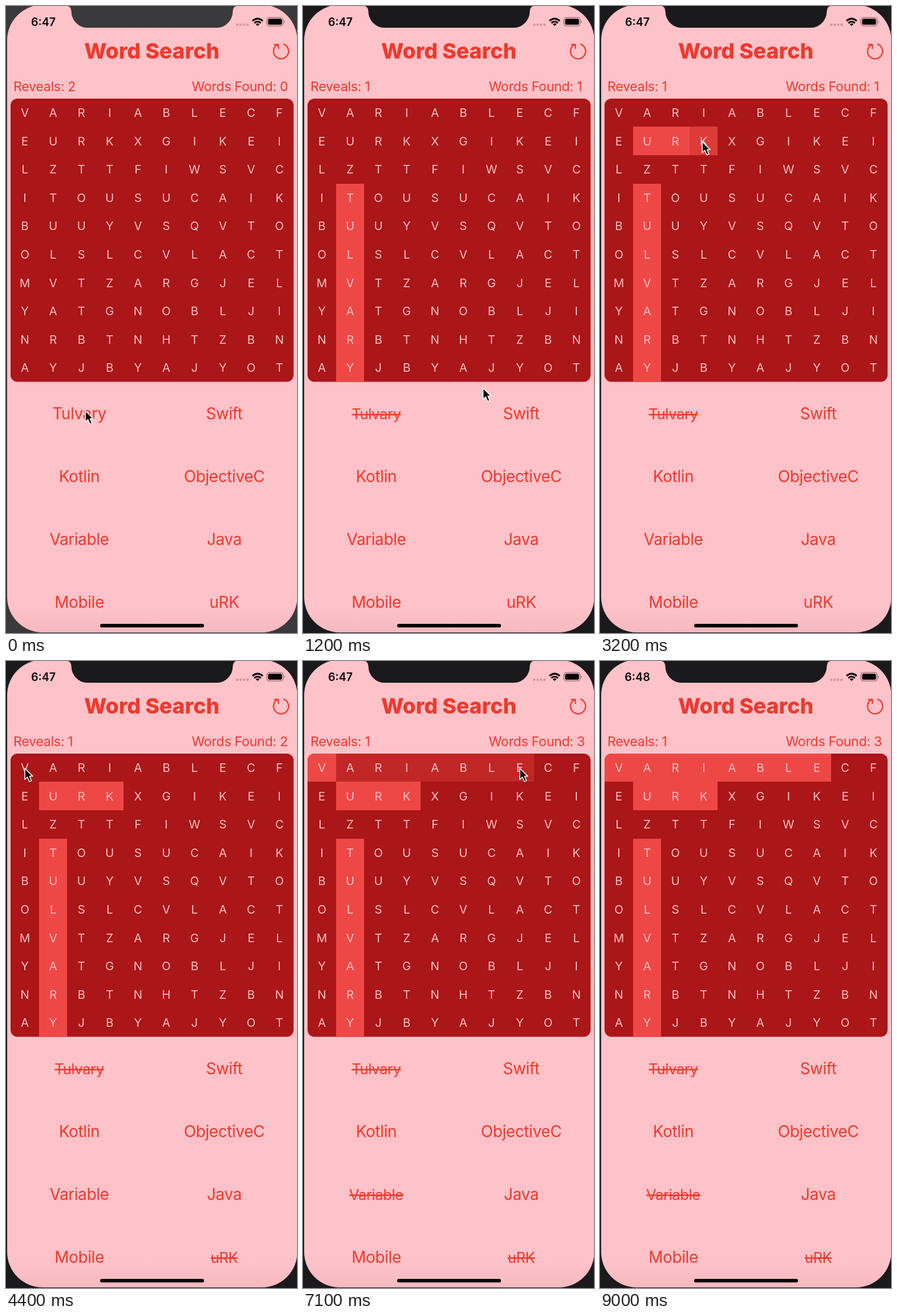
Recreate the animation shown at these times as an HTML page. Size 510 by 1097 pixels, loop 9.1 s.

```html
<!DOCTYPE html>
<html lang="en">
<head>
<meta charset="utf-8">
<title>Word Search</title>
<style>
  html, body { margin: 0; width: 100%; height: 100%; overflow: hidden; background: #1a191b; }
  svg { display: block; font-family: Inter, Roboto, sans-serif; }
  .label { font-size: 23.2px; letter-spacing: -.3px; }
  .word { font-size: 28px; letter-spacing: -.4px; text-anchor: middle; }
  .word.found { font-size: 25.6px; text-decoration: line-through; }
  .letter { font-size: 20.5px; fill: #f7bec1; text-anchor: middle; }
  #cells { fill: #ee4846; shape-rendering: crispEdges; }
</style>
</head>
<body>
<svg id="stage" width="510" height="1097" viewBox="0 0 510 1097" fill="#ef392e">
  <defs>
    <clipPath id="board"><rect x="8" y="162" width="496" height="495.5" rx="12"/></clipPath>
    <linearGradient id="shade" x2="0" y2="1">
      <stop offset=".96" stop-color="#ffc2c8"/><stop offset="1" stop-color="#f5b9bf"/>
    </linearGradient>
  </defs>
  <rect width="510" height="1097" fill="currentColor"/>
  <rect x="2" y="-2" width="508.5" height="1098" rx="62" fill="url(#shade)"/>
  <path d="M108 0Q114 1 114.5 9A28 29 0 0 0 142 38H370A28 29 0 0 0 397.5 9Q398 1 404 0Z" fill="currentColor"/>

  <text id="clock" x="65.5" y="35" font-size="19.6" font-weight="600" text-anchor="middle" fill="#080607"></text>
  <path d="M405.3 32.7H424" stroke="#cf9aa0" stroke-width="4.6" stroke-linecap="round" stroke-dasharray="0 6"/>
  <g fill="none" stroke="#080607" stroke-width="3">
    <path d="M432 26.2Q441 18 450 26.2M435.3 29.8Q441 24.8 446.7 29.8"/>
    <path d="M441 35L437.7 31.8Q441 29.3 444.3 31.8Z" fill="#080607" stroke="none"/>
    <rect x="457.2" y="20.2" width="28.6" height="14.6" rx="4.5" stroke="#8d676b" stroke-width="1.3"/>
    <rect x="459.3" y="22.3" width="24.4" height="10.4" rx="2.6" fill="#080607" stroke="none"/>
    <path d="M487.7 25.2Q490.3 27.5 487.7 30Z" fill="#8d676b" stroke="none"/>
  </g>

  <text x="255.5" y="92" font-size="37.3" font-weight="800" text-anchor="middle">Word Search</text>
  <path d="M486 66.6A13.2 13.2 0 1 1 473.2 69.4L477 67.3M469.5 67.3H477.3V75"
        fill="none" stroke="#ef392e" stroke-width="2.3"/>
  <text id="reveals" class="label" x="13" y="149"></text>
  <text id="count" class="label" x="325.5" y="149"></text>

  <g clip-path="url(#board)">
    <rect x="8" y="162" width="496" height="496" fill="#ab1618"/>
    <g id="cells"></g>
  </g>
  <g id="letters"></g>
  <g id="words"></g>
  <rect x="165" y="1081" width="182" height="6.3" rx="3.15" fill="#080506"/>
  <path id="cursor" d="M0 1V20.5L4.5 16.3L8 24.3L11.7 22.7L8.3 14.9H14Z"
        fill="#080607" stroke="#fff" stroke-width="1.5" stroke-linejoin="round"/>
</svg>
<script>
const LOOP = 9100, STEP = 100, FADE = 300, CELL = 49.57;
const $ = id => document.getElementById(id);
const cellX = col => 33 + col * CELL;
const cellY = row => 186.7 + row * CELL;

const rows = ['VARIABLECF', 'EURKXGIKEI', 'LZTTFIWSVC', 'ITOUSUCAIK', 'BUUYVSQVTO',
              'OLSLCVLACT', 'MVTZARGJEL', 'YATGNOBLJI', 'NRBTNHTZBN', 'AYJBYAJYOT'];
const words = ['Tulvary', 'Swift', 'Kotlin', 'ObjectiveC', 'Variable', 'Java', 'Mobile', 'uRK'];

// When each word is struck out, and when its i-th letter lights up
const finds = {
  Tulvary: { at: 800, lit: () => 800 },
  uRK: { at: 3300, lit: i => 2300 + i * 337 },
  Variable: { at: 7100, lit: i => i ? 7000 : 4400 },
};

// Pointer stops: time, column, row
const stops = [[0, 2.14, 10.5], [800, 2.14, 10.5], [1200, 5.7, 9.7], [2100, 1.1, .9],
               [3100, 2.95, 1], [3500, 2.95, 1], [4300, 0, 0], [4600, 0, 0],
               [5300, 8.35, 1], [6200, 9.1, .3], [7000, 7, 0], [7600, 7, 0],
               [8400, 7.4, 1.5], [LOOP, 7.4, 1.5]];

function add(parent, tag, attrs, text = '') {
  const el = document.createElementNS('http://www.w3.org/2000/svg', tag);
  for (const key in attrs) el.setAttribute(key, attrs[key]);
  el.textContent = text;
  return parent.appendChild(el);
}

// Cells that spell a word, reading across or down
function locate(word) {
  const text = word.toUpperCase();
  const across = rows.findIndex(row => row.includes(text));
  if (across >= 0) return [...text].map((_, i) => [rows[across].indexOf(text) + i, across]);
  const columns = [...rows[0]].map((_, c) => rows.map(row => row[c]).join(''));
  const down = columns.findIndex(column => column.includes(text));
  return [...text].map((_, i) => [down, columns[down].indexOf(text) + i]);
}

rows.forEach((row, r) => [...row].forEach((letter, c) =>
  add($('letters'), 'text', { class: 'letter', x: cellX(c), y: cellY(r) + 7.5 }, letter)));

const wordEls = words.map((word, i) =>
  add($('words'), 'text', { class: 'word', x: i % 2 ? 382.5 : 128.5, y: 723.3 + (i >> 1) * 109.9 }, word));

const lights = Object.entries(finds).flatMap(([word, { lit }]) =>
  locate(word).map(([c, r], i) => ({
    start: lit(i),
    el: add($('cells'), 'rect', { x: cellX(c) - CELL / 2, y: cellY(r) - CELL / 2, width: CELL, height: CELL }),
  })));

const clamp = v => Math.max(0, Math.min(1, v));
const ease = v => v * v * (3 - 2 * v);

function pointerAt(t) {
  const i = stops.findIndex(stop => stop[0] > t);
  const [t0, c0, r0] = stops[i - 1], [t1, c1, r1] = stops[i];
  const k = ease((t - t0) / (t1 - t0));
  return [cellX(c0 + (c1 - c0) * k), cellY(r0 + (r1 - r0) * k)];
}

function draw() {
  const t = Math.floor((performance.now() - start) % LOOP / STEP) * STEP;
  const isFound = word => t >= finds[word]?.at;
  $('stage').style.color = t < 500 ? '#3a393b' : t < 600 ? '#29282a' : '#1a191b';
  $('clock').textContent = t < 9000 ? '6:47' : '6:48';
  $('reveals').textContent = 'Reveals: ' + (t < finds.Tulvary.at ? 2 : 1);
  $('count').textContent = 'Words Found: ' + words.filter(isFound).length;
  wordEls.forEach((el, i) => el.classList.toggle('found', isFound(words[i])));
  lights.forEach(({ el, start }) => el.setAttribute('opacity', clamp((t - start) / FADE)));
  $('cursor').setAttribute('transform', `translate(${pointerAt(t)})`);
  $('cursor').setAttribute('visibility', t < 9000 ? 'visible' : 'hidden');
  requestAnimationFrame(draw);
}
const start = performance.now();
draw();
</script>
</body>
</html>
```
